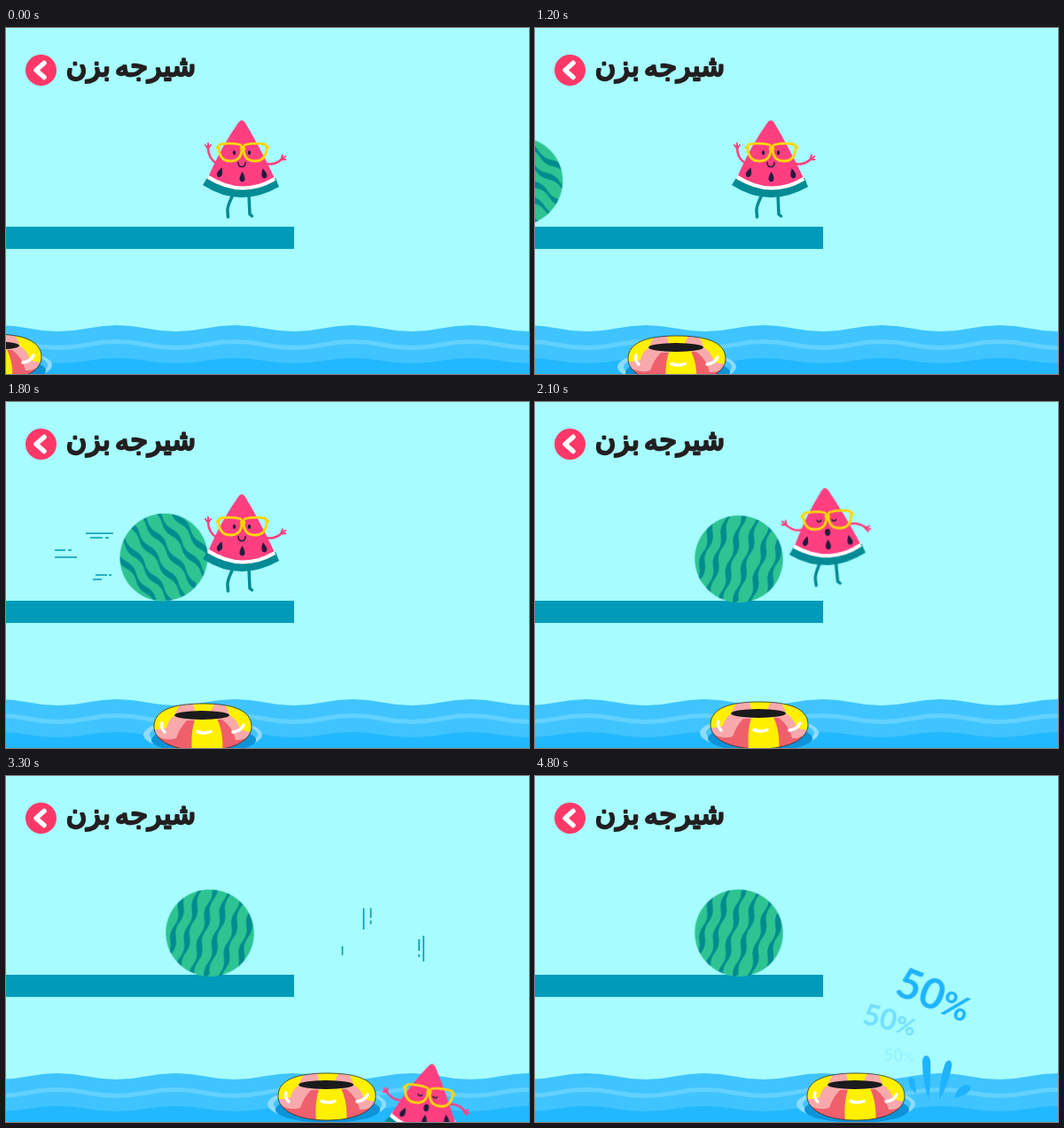
Recreate the animation shown at these times as an HTML page without scripts. Size 590 px wide and 390 px high, loop 5800 ms.

```html
<!DOCTYPE html>
<html lang="fa">
<head>
<meta charset="utf-8">
<title>شیرجه</title>
<style>
html, body { margin: 0; width: 100%; height: 100%; overflow: hidden; background: #a6fcff; }
svg { display: block; width: 590px; height: 390px; }
.title { font: 32px "DejaVu Sans", sans-serif; fill: #231f20; stroke: #231f20; stroke-width: 2.4; stroke-linejoin: round; word-spacing: -5px; }
.sale { font: 700 47px Lato, sans-serif; fill: #1fb3ff; }
.sale tspan { font-size: 39px; }
.line { fill: none; stroke-linecap: round; stroke-linejoin: round; }
.speed { stroke: #0099b5; stroke-width: 1.6; }

/* every change is a hard cut */
.step { animation: 5.8s step-end infinite; }
.sea { animation-name: sea; }
.ring { animation-name: ring; }
.melon { animation-name: melon; }
.spin { animation-name: spin; }
.slice { animation-name: slice; }
.calm { animation-name: calm; }
.shock { animation-name: shock; }
.rush { animation-name: rush; }
.fall { animation-name: fall; }
.splash { animation-name: splash; transform-origin: 448px 364px; }
.small { animation-name: small; }
.medium { animation-name: medium; }
.large { animation-name: large; }

@keyframes sea {
  0%, 10.34%, 20.68%, 31.03%, 51.72%, 62.06% { transform: none; }
  5.17%, 15.51%, 25.86%, 36.2%, 56.89%, 68.96%, 100% { transform: translateX(-67px); }
}
@keyframes ring {
  0% { transform: translate(-15px, 345px); }
  5.17% { transform: translate(40px, 345px); }
  10.34% { transform: translate(94px, 345px); }
  15.51% { transform: translate(127px, 346px); }
  20.68% { transform: translate(160px, 347px); }
  25.86% { transform: translate(191px, 344px); }
  31.03% { transform: translate(222px, 340px); }
  36.2% { transform: translate(253px, 338px); }
  41.37% { transform: translate(287px, 336px); }
  46.55% { transform: translate(326px, 335px); }
  51.72% { transform: translate(345px, 335px); }
  56.89%, 100% { transform: translate(362px, 335px); }
}
@keyframes melon {
  0% { transform: translate(-120px, 173px); }
  20.68% { transform: translate(-18px, 173px); }
  25.86% { transform: translate(80px, 174px); }
  31.03% { transform: translate(178px, 175px); }
  36.2%, 100% { transform: translate(230px, 177px); }
}
@keyframes spin {
  0%, 20.68% { transform: rotate(-55deg); }
  25.86% { transform: rotate(45deg); }
  31.03% { transform: rotate(142deg); }
  36.2%, 100% { transform: rotate(194deg); }
}
@keyframes slice {
  0%, 10.34%, 20.68%, 31.03% { transform: translate(266px, 104px); }
  5.17%, 15.51%, 25.86% { transform: translate(266px, 113px); }
  36.2% { transform: translate(327px, 97px) rotate(-3deg); }
  41.37% { transform: translate(388px, 46px) rotate(-6deg); }
  46.55% { transform: translate(448px, 18px) rotate(-9.5deg); }
  51.72% { transform: translate(468px, 172px); }
  56.89% { transform: translate(481px, 324.5px) rotate(8.5deg); }
  62.06%, 100% { transform: translate(481px, 600px); }
}
@keyframes calm { 0% { opacity: 1; } 36.2%, 100% { opacity: 0; } }
@keyframes shock { 0% { opacity: 0; } 36.2%, 100% { opacity: 1; } }
@keyframes rush { 0%, 36.2%, 100% { opacity: 0; } 31.03% { opacity: 1; } }
@keyframes fall {
  0%, 62.06%, 100% { opacity: 0; transform: none; }
  51.72% { opacity: 1; transform: translateY(-148px); }
  56.89% { opacity: 1; transform: none; }
}
@keyframes splash {
  0% { opacity: 0; transform: none; }
  62.06% { opacity: 1; transform: scale(1.1, 1.28); }
  68.96%, 100% { opacity: 1; transform: none; }
}
@keyframes small { 0% { opacity: 0; } 68.96% { opacity: 1; } 75.86% { opacity: .4; } 82.75%, 100% { opacity: .12; } }
@keyframes medium { 0% { opacity: 0; } 75.86% { opacity: 1; } 82.75%, 100% { opacity: .4; } }
@keyframes large { 0% { opacity: 0; } 82.75%, 100% { opacity: 1; } }
</style>
</head>
<body>
<svg viewBox="0 0 590 390">
  <defs>
    <pattern id="waves" x="-41" y="330" width="133" height="60" patternUnits="userSpaceOnUse">
      <path fill="#40c4ff" d="M0 8.5q33.25-7 66.5 0t66.5 0V60H0z"/>
      <path fill="none" stroke="#62d1ff" stroke-width="5" d="M0 27q33.25-7 66.5 0t66.5 0"/>
      <path fill="#22b8ff" d="M0 45q33.25-6 66.5 0t66.5 0V60H0z"/>
    </pattern>
    <clipPath id="rind"><ellipse rx="49.800" ry="49"/></clipPath>
    <path id="tube" d="M-55 26C-55 7-33 0 0 0S55 7 55 26C55 42 33 53 0 53S-55 42-55 26z"/>
    <clipPath id="tubeClip"><use href="#tube"/></clipPath>
    <path id="stripe" fill="#008b8f" d="M2-54q4 9 0 18t0 18t0 18t0 18t0 18t0 18L-3 60q-4-9 0-18t0-18t0-18t0-18t0-18t0-18z"/>
    <path id="seed" fill="#241a3f" d="M0-6Q6 4 0 5.5Q-6 4 0-6z"/>
    <path id="hand" class="line" stroke="#ff3f80" stroke-width="2" d="M0 2L-3-2M0 2V-4M0 2L3-2"/>
    <path id="lens" class="line" stroke="#ffd60a" stroke-width="2.800" d="M-11-9.500Q0-11.500 11-9Q14.500-8 12 2Q9.500 9.500 0 9.500T-12 1Q-14.500-8-11-9.500z"/>
  </defs>

  <rect width="590" height="390" fill="#a6fcff"/>
  <circle cx="39.500" cy="47.500" r="17.500" fill="#ff3868"/>
  <path class="line" stroke="#fff" stroke-width="5.500" d="M43 39.500l-9 8l9 8"/>
  <text class="title" x="141" y="54" text-anchor="middle" direction="rtl">شیرجه بزن</text>

  <path class="speed step rush" d="M90 148h31M95 153h14m3 0h4M55 167h12m3 0h4M55 175h25M101 195h13m2 0h3M98 200h10"/>
  <path class="speed step fall" d="M403.500 149v24M411.500 149v11m0 3v4M379.500 192v10M466 184v13m0 4v3M471 180v29"/>

  <rect y="224" width="325" height="25" fill="#009bba"/>
  <g class="step melon"><g class="step spin"><g clip-path="url(#rind)">
    <circle r="51" fill="#2dc492"/>
    <use href="#stripe" x="-40"/><use href="#stripe" x="-24" y="-5"/><use href="#stripe" x="-8" y="3"/>
    <use href="#stripe" x="8" y="-4"/><use href="#stripe" x="24" y="2"/><use href="#stripe" x="39" y="-2"/>
  </g></g></g>

  <rect class="step sea" y="330" width="670" height="60" fill="url(#waves)"/>

  <g class="step splash" fill="#1fb3ff">
    <path d="M437 322C437 313 445.500 313 446 322Q447 345 444 364Q437 345 437 322z"/>
    <path d="M462 326C464 319 471 319 470 327Q467 347 456 365Q456 342 462 326z"/>
    <path d="M473 363Q476 349 488 348Q494 349 490 355Q484 361 473 363z"/>
    <path d="M421 341Q426 337 429 345L430 358Q421 352 421 341z"/>
  </g>

  <g class="step ring">
    <ellipse cy="35" rx="67" ry="19" fill="#8cdcff"/>
    <ellipse cx="1" cy="35" rx="61" ry="16" fill="#40c4ff"/>
    <ellipse cx="1" cy="41" rx="59" ry="15" fill="#0d93d8"/>
    <g clip-path="url(#tubeClip)">
      <use href="#tube" fill="#f8a9ab"/>
      <path fill="#ef5f6c" d="M-56 34Q-42 43-30 39Q-26 27-18 19H-8V56H-58zM58 33Q47 42 37 41Q34 27 22 18H12V56H58z"/>
      <path fill="#fff000" d="M-31 13Q-30 6-24 0H-60V29Q-47 30-41 27Q-39 18-31 13zM30 13Q29 7 24 0H60V31Q51 33 42 29Q39 18 30 13zM-9 9L-11 0H13L9 9zM-9 18Q-14 34-12 54H22Q24 34 16 17z"/>
    </g>
    <use href="#tube" fill="none" stroke="#2b2b20" stroke-width=".8"/>
    <ellipse cx="-1" cy="13" rx="31" ry="5" fill="#1b1a1c"/>
    <path class="line" stroke="#fff" stroke-width="3.500" d="M-46 22q-2 5 3 10M-6 31.500q8 3 15 0M34 32q9-1 12-8"/>
  </g>

  <g class="step slice"><g transform="translate(-266 -104)">
    <path class="line" stroke="#008b95" stroke-width="3.500" d="M256 188Q249 202 250 207L250.500 213M274 188L275 210L277.500 212"/>
    <g class="step calm">
      <path class="line" stroke="#ff3f80" stroke-width="2.500" d="M238 153Q228 147 228 135M294 153Q303 155 311 148"/>
      <use href="#hand" x="228" y="134"/>
      <use href="#hand" transform="translate(312 147) rotate(55)"/>
    </g>
    <g class="step shock">
      <path class="line" stroke="#ff3f80" stroke-width="2.500" d="M240 149Q229 153 219 142M292 146Q302 144 311 152"/>
      <use href="#hand" transform="translate(219 142) rotate(-45)"/>
      <use href="#hand" transform="translate(311 152) rotate(100)"/>
    </g>
    <path fill="#008b95" d="M222 177L227 169H304L308 179Q264 204 222 177z"/>
    <path fill="#fff" d="M227 170L230 163H301L304 172Q266 194 227 170z"/>
    <path fill="#ff3f80" d="M262 107Q266 101 270 107Q285 132 302.500 168Q266 190 229 166Q244 132 262 107z"/>
    <use href="#seed" transform="translate(241.500 163) rotate(20)"/>
    <use href="#seed" x="266.500" y="168"/>
    <use href="#seed" transform="translate(291 164) rotate(-12)"/>
    <use href="#lens" x="253" y="140.500"/>
    <use href="#lens" transform="translate(281 140.500) scale(-1 1)"/>
    <path class="line" stroke="#ffd60a" stroke-width="2.800" d="M265 136q2-2 4 0M240 133l-2 2M294 133l2 2"/>
    <g class="step calm">
      <g fill="#241a3f"><ellipse cx="257.500" cy="140.500" rx="1.700" ry="2.600"/><ellipse cx="274.500" cy="140.500" rx="1.700" ry="2.600"/></g>
      <path class="line" stroke="#241a3f" stroke-width="1.500" d="M262 151.500q0 5 4 5t4-5"/>
    </g>
    <g class="step shock">
      <path class="line" stroke="#241a3f" stroke-width="1.300" d="M255 140q2.500 3.500 5 0M272 140q2.500 3.500 5 0"/>
      <ellipse cx="266.500" cy="154" rx="3" ry="4" fill="#241a3f"/>
    </g>
  </g></g>

  <g class="step small"><text class="sale" transform="translate(393 321) rotate(2) scale(.4)">50<tspan>%</tspan></text></g>
  <g class="step medium"><text class="sale" transform="translate(368 279) rotate(14) scale(.7)">50<tspan>%</tspan></text></g>
  <g class="step large"><text class="sale" transform="translate(404 246) rotate(22)">50<tspan>%</tspan></text></g>
</svg>
</body>
</html>
```
